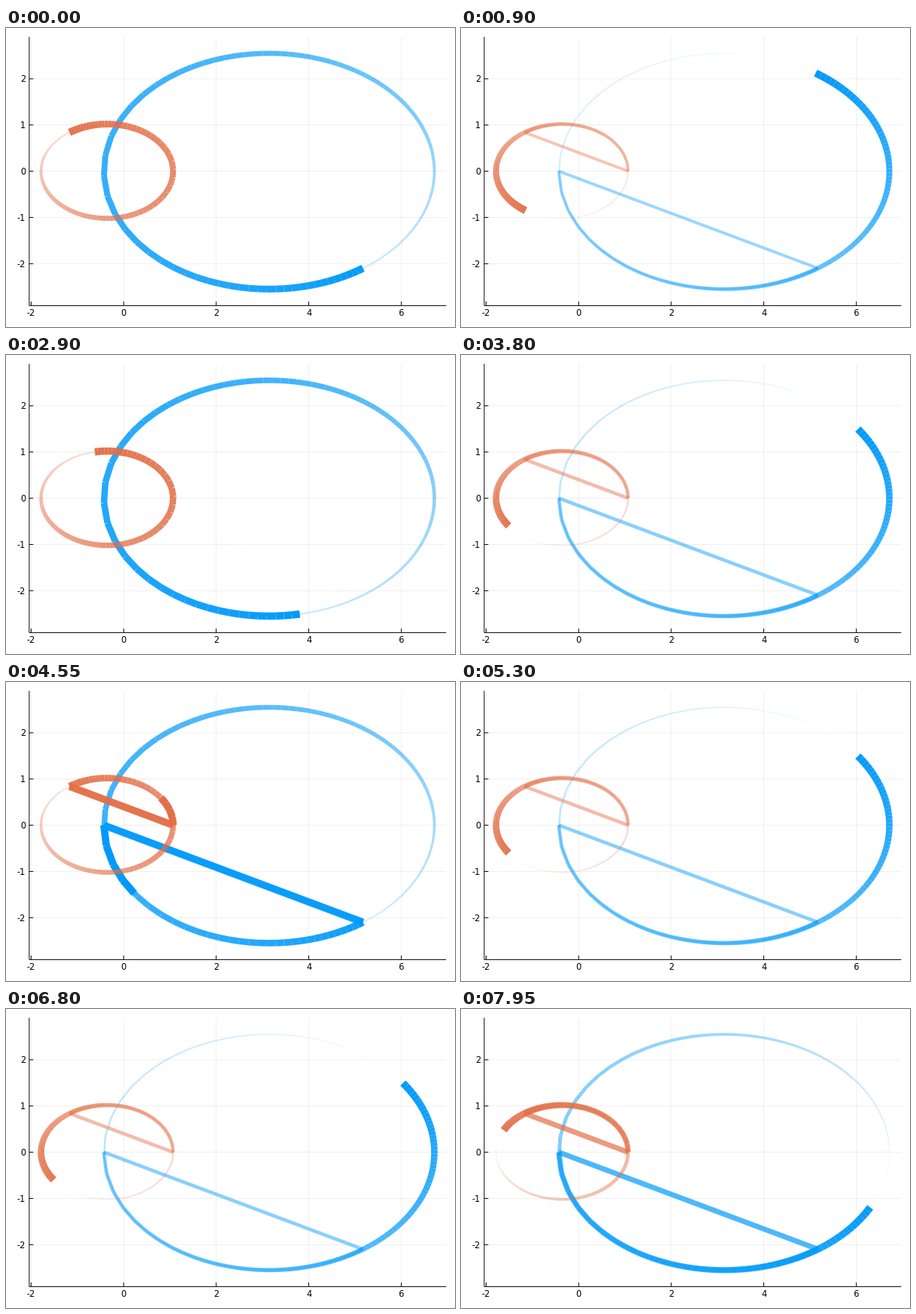
Animation of 600 by 400 pixels, one loop 8 s. Source, as a matplotlib script:

```python
import numpy as np
import matplotlib.pyplot as plt
from matplotlib.animation import FuncAnimation
from matplotlib.collections import LineCollection

W, H, DPI = 600, 400, 100
PX = 72 / DPI                      # one pixel in points
X0, Y0, UNIT = 157.22, 191.6, 61.84  # pixel position of the origin, pixels per unit
LEFT, RIGHT, TOP, BOTTOM = 31.0, 588.2, 11.8, 371.4

N, STEP = 150, 5                   # samples per orbit run, samples per frame
ECC = 0.7
MEAN_STEP = 0.0529                 # mean anomaly between samples
CENTRE = 4.5 / 7                   # shared focus of both orbits


def to_px(x, y):
    return X0 + UNIT * x, Y0 - UNIT * y


def eccentric_anomaly(mean):
    e = mean + ECC * np.sin(mean)
    for _ in range(30):
        e -= (e - ECC * np.sin(e) - mean) / (1 - ECC * np.cos(e))
    return e


def orbit(a):
    """Pixel points of an ellipse; the sign of a picks the side of periapsis."""
    e = eccentric_anomaly(MEAN_STEP * np.arange(N))
    x = CENTRE + a * (np.cos(e) - ECC)
    y = a * np.sqrt(1 - ECC ** 2) * np.sin(e)
    return np.column_stack(to_px(x, y))


fig = plt.figure(figsize=(W / DPI, H / DPI), dpi=DPI, facecolor="white")
ax = fig.add_axes([0, 0, 1, 1])
ax.set_xlim(0, W)
ax.set_ylim(H, 0)
ax.axis("off")


def line(x, y, width=1, alpha=1, z=2):
    ax.plot(x, y, color="black", lw=width * PX, alpha=alpha, zorder=z,
            solid_capstyle="butt", snap=False)


def grid(x, y):
    line(x, y, width=0.6, alpha=0.1, z=1)


def label(x, y, value, ha):
    ax.text(x, y, str(value), ha=ha, va="center_baseline", color="black",
            family="DejaVu Sans", fontsize=8.3, parse_math=False)


for v in (-2, 0, 2, 4, 6):
    x, _ = to_px(v, 0)
    grid([x, x], [TOP, BOTTOM])
    line([x, x], [BOTTOM, BOTTOM - 5.5])
    label(x, 380.3, v, "center")
for v in (-2, -1, 0, 1, 2):
    _, y = to_px(0, v)
    grid([LEFT, RIGHT], [y, y])
    line([LEFT, LEFT + 5.5], [y, y])
    label(26.3, y - 0.5, v, "right")
line([LEFT, LEFT], [TOP, BOTTOM])
line([LEFT, RIGHT], [BOTTOM, BOTTOM])

fade = np.arange(N - 1) / (N - 1)


def add_trail(rgb, z):
    colors = np.zeros((N - 1, 4))
    colors[:, :3] = np.array(rgb) / 255
    colors[:, 3] = fade
    trail = LineCollection([], colors=colors, linewidths=10 * PX * fade,
                           capstyle="butt", zorder=z)
    trail.set_snap(False)
    ax.add_collection(trail, autolim=False)
    return trail


bodies = [
    (orbit(-25 / 7), add_trail((0, 154, 250), 3)),
    (orbit(10 / 7), add_trail((227, 111, 71), 4)),
]


def update(k):
    order = (STEP * k + np.arange(N)) % N
    for points, trail in bodies:
        p = points[order]
        trail.set_segments(np.stack([p[:-1], p[1:]], axis=1))
    return [trail for _, trail in bodies]


anim = FuncAnimation(fig, update, frames=160, interval=50, repeat=True,
                     repeat_delay=0, init_func=lambda: update(0))
plt.show()
```
